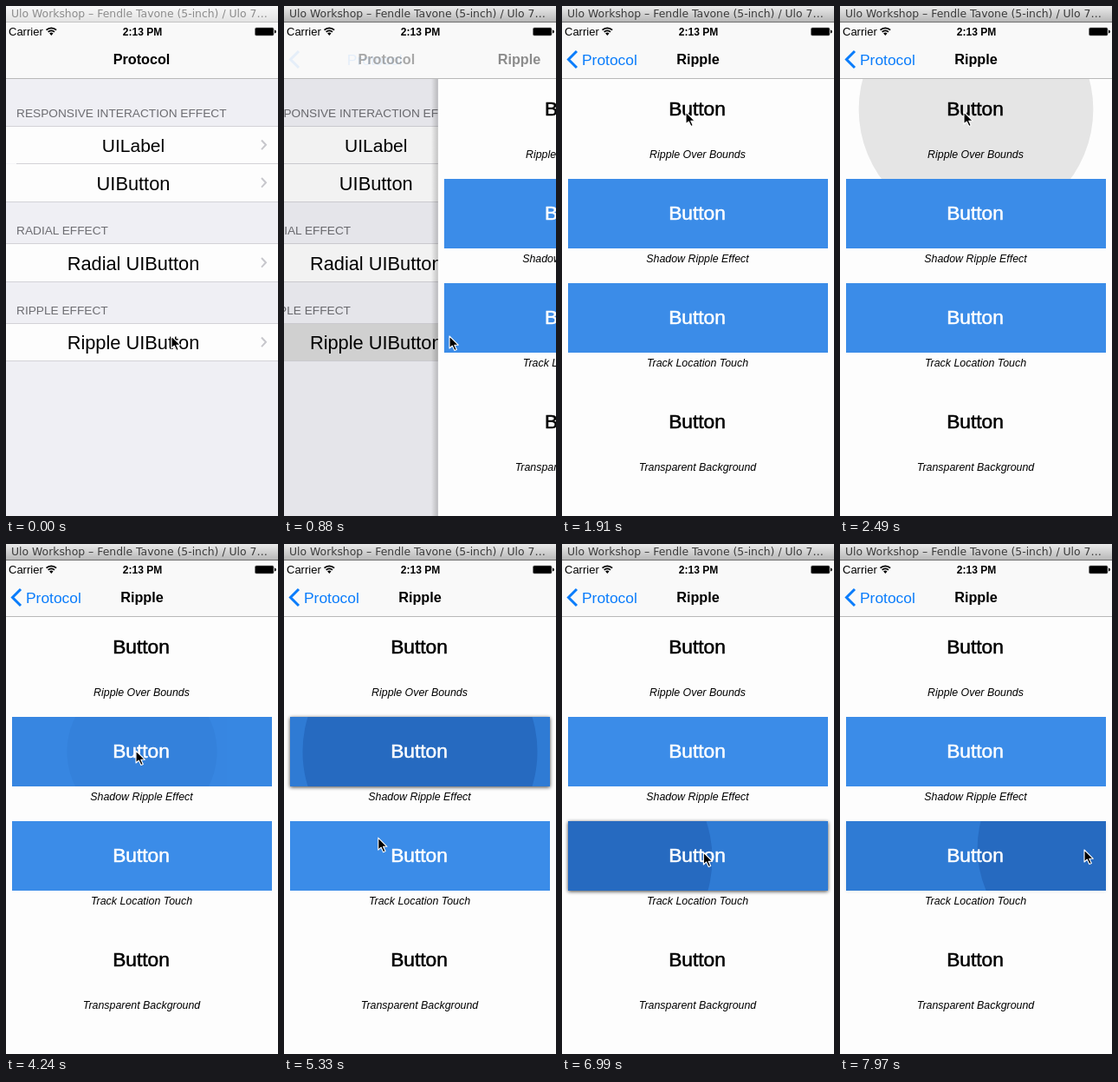
An HTML page that plays this animation: 314x587 px, repeating every 8 s.

```html
<!DOCTYPE html>
<html lang="en">
<head>
<meta charset="utf-8">
<title>Ripple buttons</title>
<style>
  html, body { margin: 0; width: 100%; height: 100%; overflow: hidden; background: #fdfdfd; }
  svg { display: block; width: 314px; height: 587px; }
  text { font-family: "Liberation Sans", Arial, sans-serif; white-space: pre; }
  .mid { text-anchor: middle; }
  .window { font: 12.4px "DejaVu Sans", sans-serif; }
  .header { font-size: 13.7px; fill: #6d6d72; }
  .cell { font-size: 21.8px; }
  .nav { font-size: 16.2px; font-weight: bold; }
  .button { font-size: 22.7px; stroke-width: .55px; }
  .caption { font-size: 12.4px; font-style: italic; }
</style>
</head>
<body>
<svg id="stage" viewBox="0 0 314 587"></svg>
<script>
const LOOP = 8000, WIDTH = 314, RADIUS = 135.5;
const stage = document.getElementById('stage');

const text = (x, y, cls, content, extra = '') =>
  `<text x="${x}" y="${y}" class="${cls}" ${extra}>${content}</text>`;
const rect = (x, y, w, h, fill, extra = '') =>
  `<rect x="${x}" y="${y}" width="${w}" height="${h}" fill="${fill}" ${extra}/>`;
const line = (x, y) => rect(x, y, WIDTH - x, 1, '#d3d2d7');
const chevron = y =>
  `<path d="M295 ${y - 5}l5 5.3l-5 5.3" fill="none" stroke="#c7c7cc" stroke-width="2"/>`;

const cell = (y, label, id = '', size = 21.8) =>
  rect(0, y, WIDTH, 43, '#fdfdfd', id && `id="${id}"`) +
  text(147, y + 29.5, 'cell mid', label, `style="font-size:${size}px"`) + chevron(y + 21);

const list = rect(0, 83, WIDTH, 504, '#efeff4') +
  text(12, 128, 'header', 'RESPONSIVE INTERACTION EFFECT') +
  text(12, 263, 'header', 'RADIAL EFFECT') +
  text(12, 355, 'header', 'RIPPLE EFFECT') +
  cell(138.5, 'UILabel', '', 21) + cell(182, 'UIButton') +
  cell(274, 'Radial UIButton') + cell(365.5, 'Ripple UIButton', 'tapped') +
  line(0, 138) + line(12, 181) + line(0, 225) +
  line(0, 273) + line(0, 317) + line(0, 365) + line(0, 408);

const label = (y, color, caption) =>
  text(156, y + 47, 'button mid', 'Button', `fill="${color}" stroke="${color}"`) +
  text(156.5, y + 96, 'caption mid', caption);

const blueButton = (y, n, caption) =>
  rect(7, y + 1, 300, 80, '#000', `id="shadow${n}" filter="url(#blur)"`) +
  rect(7, y, 300, 80, '#3b8ce8') +
  `<g id="ripple${n}" clip-path="url(#bounds${n})">${rect(7, y, 300, 80, '#2f7bd4')}
   <circle id="circle${n}" fill="#266ac0"/></g>` + label(y, '#fff', caption);

const page = rect(-8, 83, 8, 504, 'url(#edge)') + rect(0, 83, WIDTH, 504, '#fdfdfd') +
  `<g id="ripple0"><circle id="circle0" fill="#e5e5e5"/></g>` +
  label(79, '#000', 'Ripple Over Bounds') +
  blueButton(199, 1, 'Shadow Ripple Effect') +
  blueButton(319, 2, 'Track Location Touch') +
  label(439, '#000', 'Transparent Background');

const gradient = (id, top, bottom) => `<linearGradient id="${id}" x2="0" y2="1">
  <stop stop-color="${top}"/><stop offset="1" stop-color="${bottom}"/></linearGradient>`;

const arc = r => `M${52.3 - r * .72} ${33.5 - r * .72}a${r} ${r} 0 0 1 ${r * 1.44} 0`;
const statusBar = text(3, 33.5, '', 'Carrier', 'font-size="13"') +
  `<path d="${arc(8)}${arc(5)}" fill="none" stroke="#000" stroke-width="1.8"/>
   <path d="M52.3 34l-2.2-2.4a3 3 0 0 1 4.4 0z"/>` +
  text(157.5, 33.5, 'mid', '2:13 PM', 'font-size="12" font-weight="bold"') +
  `<rect x="287.5" y="25" width="21.5" height="9" rx="1.5" fill="#000" stroke="#777" stroke-width=".6"/>
   <path d="M310 27.5q2 .5 2 2t-2 2z"/>`;

stage.innerHTML = `<defs>
    ${gradient('idle', '#f8f8f8', '#e4e4e4')}${gradient('active', '#ebebeb', '#b8b8b8')}
    <linearGradient id="edge"><stop stop-opacity="0"/><stop offset="1" stop-opacity=".2"/></linearGradient>
    <filter id="blur" x="-10%" y="-20%" width="120%" height="140%"><feGaussianBlur stdDeviation="2.3"/></filter>
    <clipPath id="bounds1">${rect(7, 199, 300, 80, '#000')}</clipPath>
    <clipPath id="bounds2">${rect(7, 319, 300, 80, '#000')}</clipPath>
  </defs>
  <g id="list">${list}</g>
  ${rect(0, 83, WIDTH, 504, '#000', 'id="dim"')}
  <g id="page">${page}</g>
  ${rect(0, 18, WIDTH, 65, '#f9f9f9')}${rect(0, 83, WIDTH, 1, '#b9b9b9')}
  ${text(156.5, 67, 'nav mid', 'Protocol', 'id="oldTitle"')}
  ${text(157, 67, 'nav mid', 'Ripple', 'id="newTitle"')}
  <path id="backArrow" d="M17 52l-9.5 9.5l9.5 9.5" fill="none" stroke="#0a7cfb" stroke-width="3"/>
  ${text(23, 67.5, '', 'Protocol', 'id="backLabel" font-size="17.4" fill="#0a7cfb"')}
  ${statusBar}
  ${rect(0, 0, WIDTH, 18, '', 'id="windowBar"')}${rect(0, 18, WIDTH, 1, '', 'id="windowEdge"')}
  ${text(6, 13, 'window', 'Ulo Workshop – Fendle Tavone (5-inch) / Ulo 7…', 'id="windowTitle"')}
  <path id="cursor" d="M0 0v14l3.3-3l2.6 5.6l2.4-1.1l-2.5-5.3h4.4z" fill="#000"
    stroke="#fff" stroke-width="1.1" stroke-linejoin="round"/>`;

const set = (id, attrs) => {
  const node = document.getElementById(id);
  for (const name in attrs) node.setAttribute(name, attrs[name]);
};
const clamp = v => Math.min(1, Math.max(0, v));
const smooth = v => v * v * (3 - 2 * v);
const easeOut = v => 1 - (1 - v) ** 3;

// time, x, y of the pointer tip
const pointer = [
  [0, 191, 380], [1290, 191, 380], [1560, 150, 211], [1910, 143, 122],
  [3190, 143, 122], [3700, 150, 238], [5200, 150, 238], [5330, 109, 338],
  [5620, 38, 362], [6850, 38, 362], [6990, 163, 355], [7300, 282, 352], [LOOP, 282, 352]
];

const touches = [
  { target: 0, x: 157, y: 119, down: 2230, fade: 3190 },
  { target: 1, x: 157, y: 239, down: 4210, fade: 5290 },
  { target: 2, x: 38, y: 362, down: 6220, fade: 6950 },
  { target: 2, x: 282, y: 350, down: 7840, fade: 9000 }
];

function pointerAt(t) {
  const i = Math.max(1, pointer.findIndex(key => key[0] > t));
  const [t0, x0, y0] = pointer[i - 1], [t1, x1, y1] = pointer[i];
  const k = (t - t0) / (t1 - t0);
  return [x0 + (x1 - x0) * k, y0 + (y1 - y0) * k];
}

function drawRipple(target, t) {
  const touch = touches.filter(o => o.target === target && o.down <= t).pop();
  const age = touch ? t - touch.down : 0;
  const remain = touch ? 1 - smooth(clamp((t - touch.fade) / 570)) : 0;
  set('ripple' + target, { opacity: clamp(age / 100) * remain });
  if (touch) {
    const r = RADIUS * (.5 + .5 * easeOut(clamp(age / 300)));
    set('circle' + target, { cx: touch.x, cy: touch.y, r });
  }
  if (target) set('shadow' + target, { opacity: .75 * smooth(clamp(age / 700)) * remain });
}

function drawPush(t) {
  const x = .0189 * Math.max(0, t - 803);
  const left = t > 1560 ? 0 : (1 + x) * Math.exp(-x);   // critically damped spring
  const done = 1 - left;
  set('list', { transform: `translate(${-94 * done})` });
  set('dim', { opacity: .1 * done });
  set('page', { transform: `translate(${WIDTH * left})`, visibility: done ? 'visible' : 'hidden' });
  set('oldTitle', { transform: `translate(${-88 * done})`, opacity: left ** 2 });
  set('newTitle', { transform: `translate(${202 * left})`, opacity: done });
  set('backArrow', { opacity: done ** 3 });
  set('backLabel', { transform: `translate(${88 * left})`, opacity: done ** 3 });
}

function draw(now) {
  const t = now % LOOP, active = t >= 770;
  set('windowBar', { fill: `url(#${active ? 'active' : 'idle'})` });
  set('windowEdge', { fill: active ? '#707070' : '#c4c4c4' });
  set('windowTitle', { fill: active ? '#3a3a3a' : '#8c8c8c' });
  set('tapped', { fill: active ? '#d9d9d9' : '#fdfdfd' });
  drawPush(t);
  for (let target = 0; target < 3; target++) drawRipple(target, t);
  set('cursor', { transform: `translate(${pointerAt(t)})` });
  requestAnimationFrame(draw);
}
draw(performance.now());
</script>
</body>
</html>
```
